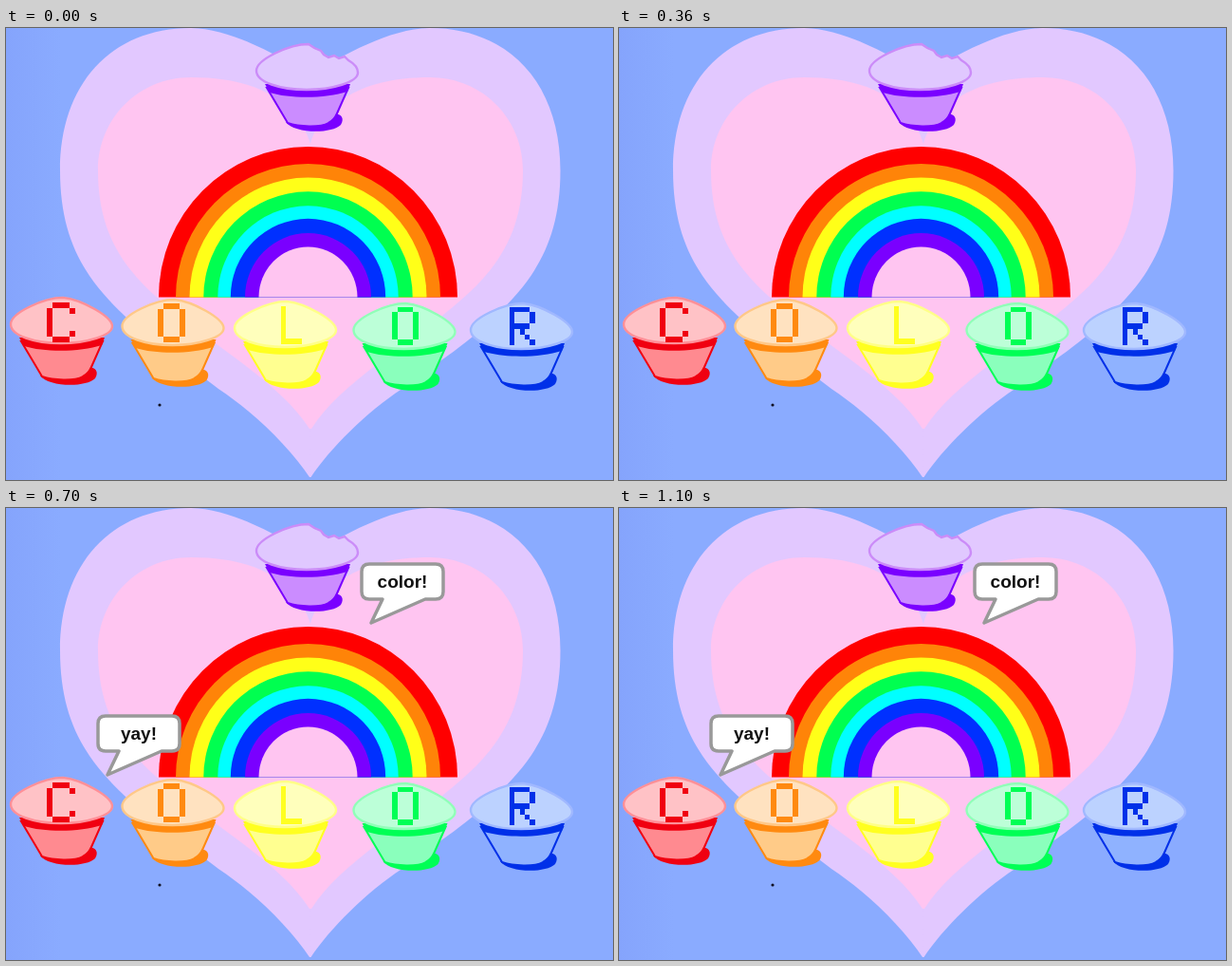
Write an HTML page that moves like this. It is 640x476 px and loops after 1120 ms.

```html
<!DOCTYPE html>
<html lang="en">
<head>
<meta charset="utf-8">
<title>Color cups</title>
<style>
  html, body { margin: 0; width: 100%; height: 100%; overflow: hidden; background: #8aabff; }
  svg { display: block; width: 100%; height: 100%; }
  text { font: bold 19px "Liberation Sans", Arial, sans-serif; text-anchor: middle; fill: #111; }
</style>
</head>
<body>
<svg viewBox="0 0 640 476">
  <defs>
    <linearGradient id="sky">
      <stop offset="0" stop-color="#85a4fc"/>
      <stop offset=".09" stop-color="#8aabff"/>
    </linearGradient>
    <path id="outer" d="M321 50C285 28 238 1 195 0C110 0 57 60 57 150C57 225 85 265 125 303C163 340 197 358 224 380C262 405 300 443 320 473H321Z"/>
    <path id="inner" d="M321 122C310 85 275 52 195 52C140 52 97 95 97 150C97 207 117 248 163 287C218 335 288 372 320 422H321Z"/>
    <g id="bubble" fill="#fff" stroke="#999" stroke-width="3.5" stroke-linejoin="round">
      <path d="M383 59H453Q461 59 461 67V88Q461 96 453 96H442L385 121L397 96H383Q375 96 375 88V67Q375 59 383 59Z"/>
    </g>
  </defs>
  <rect width="640" height="476" fill="url(#sky)"/>
  <g fill="#e2c8ff">
    <use href="#outer"/>
    <use href="#outer" transform="matrix(-1 0 0 1 641.5 0)"/>
  </g>
  <g fill="#ffc5f1">
    <use href="#inner"/>
    <use href="#inner" transform="matrix(-1 0 0 1 642 0)"/>
  </g>
  <g id="rainbow"></g>
  <g id="cups"></g>
  <circle cx="162" cy="397" r="1.6" fill="#112"/>
  <g id="speech">
    <use href="#bubble"/>
    <text x="418" y="84">color!</text>
    <use href="#bubble" x="-278" y="160"/>
    <text x="140" y="244">yay!</text>
  </g>
</svg>
<script>
const LOOP = 1120;
const byId = id => document.getElementById(id);

// Half discs from the outside in; the last one is the opening.
const hues = ['#f00', '#ff8408', '#ffff18', '#00ff50', '#0ff', '#0030ff', '#7a00ff', '#ffc5f1'];
const radii = [157.5, 139.5, 125, 110.2, 95.2, 81.7, 66.5, 52];
byId('rainbow').innerHTML = radii.map((r, i) =>
  `<path d="M${318.5 - r} 283.5a${r} ${r + 1} 0 0 1 ${2 * r} 0" fill="${hues[i]}"/>`
).join('');

const glyphs = {
  C: ['.###.', '#...#', '#....', '#....', '#....', '#...#', '.###.'],
  O: ['.###.', '#...#', '#...#', '#...#', '#...#', '#...#', '.###.'],
  L: ['#...', '#...', '#...', '#...', '#...', '#...', '####'],
  R: ['####.', '#...#', '#...#', '####.', '#.#..', '#..#.', '#...#']
};

function letter(char, x, y, w, h) {
  let d = '';
  glyphs[char].forEach((row, j) => [...row].forEach((cell, i) => {
    if (cell === '#') d += `M${x + i * w} ${y + j * h}h${w}v${h}h${-w}z`;
  }));
  return `<path d="${d}" shape-rendering="crispEdges"/>`;
}

const smooth = 'C80 286 112 304 112 314';
const bitten = 'L66 288L73 291L76 295L81 298L87 296L92 299L98 297L102 301C109 305 112 309 112 314';

function cup(x, y, dark, body, cap, rim, top, mark) {
  return `<g transform="translate(${x} ${y})">
    <path fill="${dark}" d="M36 366C44 378 84 379 94 369C98 362 95 357 86 357Z"/>
    <path fill="${body}" stroke="${dark}" stroke-width="2" d="M16 330L38 367C50 371 72 372 81 367Q87 364 90 357L102 330Z"/>
    <path fill="${dark}" d="M14 326H104L101 334C78 341.5 40 341.5 19 335Z"/>
    <path fill="${cap}" stroke="${rim}" stroke-width="2.4" d="M5 312C5 300 40 284 60 284${top}C112 324 85 332 58 332C30 332 5 324 5 312Z"/>
  </g><g fill="${dark}">${mark}</g>`;
}

byId('cups').innerHTML =
  cup(259, -267, '#7a00ff', '#cb8cff', '#e0c8ff', '#cb8cf8', bitten, '') +
  cup(0, 0, '#f00010', '#ff8a90', '#ffc2c6', '#ff9098', smooth, letter('C', 43, 289, 6, 6)) +
  cup(117.5, 2, '#ff8a10', '#ffcb88', '#ffe2c0', '#ffc888', smooth, letter('O', 160, 290, 5.8, 5.9)) +
  cup(236, 4, '#ffff20', '#ffff90', '#ffffbc', '#ffff88', smooth, letter('L', 290, 293, 5.4, 5.7)) +
  cup(361.5, 6, '#00ff55', '#8affbc', '#bcffd8', '#90ffb8', smooth, letter('O', 407, 293.5, 5.5, 5.8)) +
  cup(485, 6, '#0030e8', '#8fb2ff', '#bcd2ff', '#a0b8ff', smooth, letter('R', 531, 293.5, 5.3, 5.8));

const speech = byId('speech');
function draw(now) {
  speech.style.visibility = now % LOOP < LOOP / 2 ? 'hidden' : 'visible';
  requestAnimationFrame(draw);
}
draw(performance.now());
</script>
</body>
</html>
```
